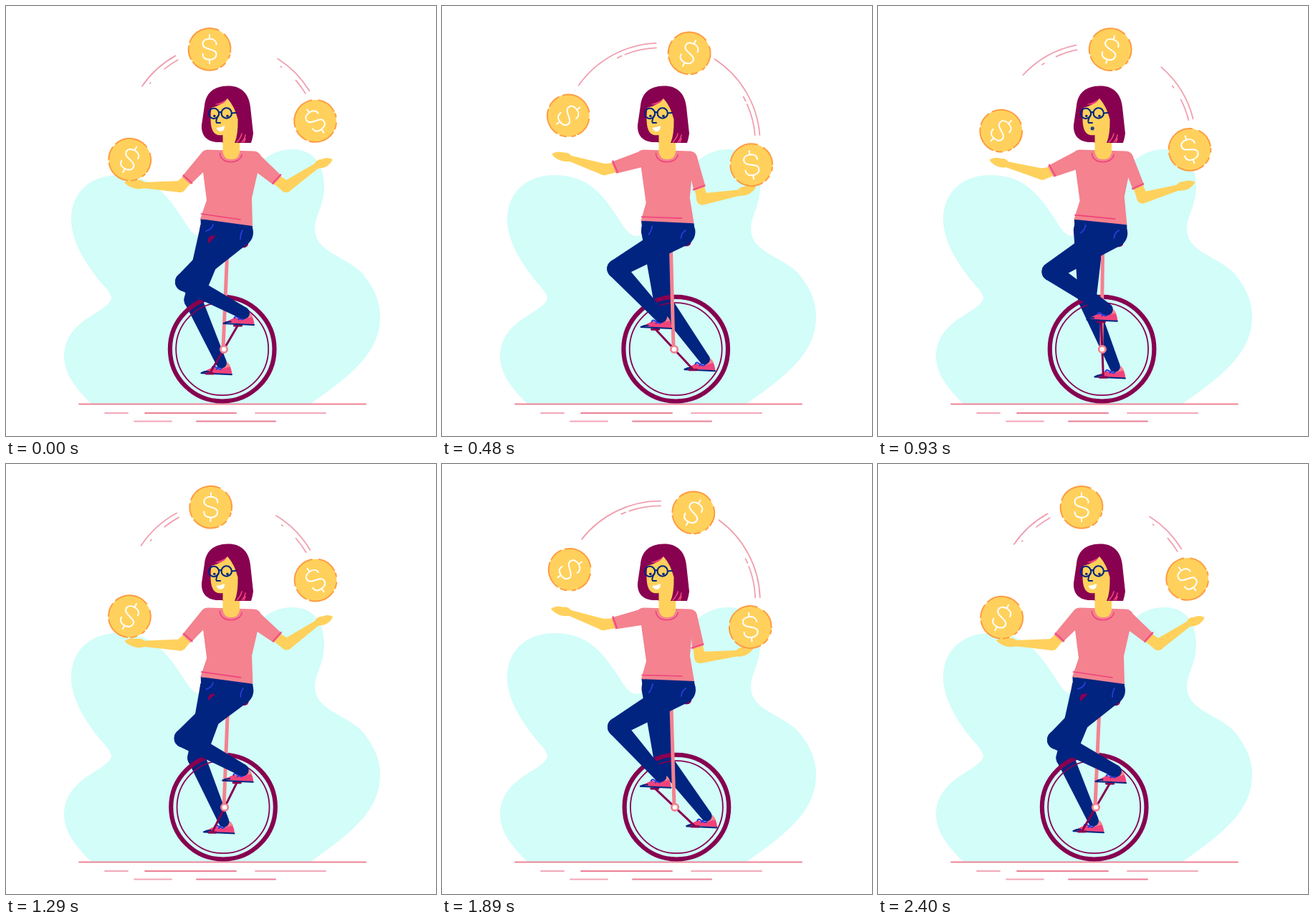
An HTML page with a canvas for the animation above (2430 ms loop, 600 by 600 pixels).

```html
<!DOCTYPE html>
<html lang="en">
<head>
<meta charset="utf-8">
<title>Juggling unicyclist</title>
<style>
  html, body { margin: 0; width: 100%; height: 100%; overflow: hidden; background: #fff; }
  canvas { display: block; }
</style>
</head>
<body>
<canvas id="stage" width="600" height="600"></canvas>
<script>
const ctx = document.getElementById('stage').getContext('2d');
const TAU = Math.PI * 2, RAD = Math.PI / 180;
const LOOP = 2430, STEP = 30, SWING = 1200, REACH = 690;
const C = {
  mint: '#d2fdf9', navy: '#002480', wine: '#870150', rose: '#f4828f', hot: '#f0437b',
  skin: '#ffd15c', orange: '#ff9c42', blue: '#2b3bdc', trail: '#f0a0b0', white: '#fff'
};

// Eased back-and-forth: 0 at time zero, 1 at REACH, with its own lag and bias.
function swing(t, lag, bias) {
  const g = time => {
    const u = (1 - Math.cos(TAU * (time - lag) / SWING)) / 2;
    return u + bias * u * (1 - u);
  };
  return (g(t) - g(0)) / (g(REACH) - g(0));
}

// Quadratic blend through three poses at 0, mid and 1.
const blender = (v, mid) => (a, b, c) => a.map((p, i) => {
  const k = ((b[i] - p) / mid - (c[i] - p)) / (mid - 1);
  return p + v * (c[i] - p - k) + v * v * k;
});

function fill(color, d) {
  ctx.fillStyle = color;
  ctx.fill(new Path2D(d));
}

function stroke(color, width, d) {
  ctx.strokeStyle = color;
  ctx.lineWidth = width;
  ctx.stroke(new Path2D(d));
}

function arc(color, width, x, y, r, from = 0, to = 360) {
  ctx.beginPath();
  ctx.arc(x, y, r, from * RAD, to * RAD);
  ctx.strokeStyle = color;
  ctx.lineWidth = width;
  ctx.stroke();
}

function disc(color, x, y, r) {
  ctx.beginPath();
  ctx.arc(x, y, r, 0, TAU);
  ctx.fillStyle = color;
  ctx.fill();
}

// Tapered segment with round ends.
function limb(color, [x0, y0], r0, [x1, y1], r1) {
  const a = Math.atan2(y1 - y0, x1 - x0);
  const nx = -Math.sin(a), ny = Math.cos(a);
  disc(color, x0, y0, r0);
  disc(color, x1, y1, r1);
  ctx.beginPath();
  ctx.moveTo(x0 + nx * r0, y0 + ny * r0);
  ctx.lineTo(x1 + nx * r1, y1 + ny * r1);
  ctx.lineTo(x1 - nx * r1, y1 - ny * r1);
  ctx.lineTo(x0 - nx * r0, y0 - ny * r0);
  ctx.fill();
}

function at(x, y, angle, draw) {
  ctx.save();
  ctx.translate(x, y);
  ctx.rotate(angle * RAD);
  draw();
  ctx.restore();
}

function background() {
  fill(C.mint, `M119 555C95 531 81 512 81 488C82 452 112 437 132 424Q147 414 147 407
    Q146 401 138 392C110 360 91 327 91 298C91 260 118 236 157 236C204 236 224 263 246 296
    C254 309 261 321 272 321C312 318 325 200 400 200C432 200 444 226 444 252
    C443 282 431 292 431 312C432 344 474 349 497 373C511 390 522 409 522 433
    C522 482 486 512 425 555Z`);
  stroke('#ee8496', 1.8, 'M102 555.5H502');
  stroke('#ea7f95', 1.8, 'M194 568H321M266 579.5H376');
  stroke('#f3a6b7', 1.8, 'M138 568H170M348 568H446M179 579.5H231');
}

function shoe([x, y]) {
  at(x, y, 0, () => {
    fill(C.rose, 'M27 -8L35 -16Q40 -14 42 -8L42 -4H30Z');
    fill(C.hot, 'M2 -.5Q9 -4 17 -8L27 -5L40 -8.5Q43 -8 44 2Z');
    stroke(C.navy, 2, 'M1 .2Q6 -2.5 11 -2M1 .4L43.5 2.4');
    stroke(C.blue, 2, 'M16 -7Q17 -11 21 -8L27 -5Q31 -6 29 -9Q25 -10 22 -5');
  });
}

function pocketLines(pose) {
  const [a, b, c, d, e, f, g, h] = pose(
    [279, 314, 289, 305, 327, 325, 330, 313],
    [284, 317, 290, 306, 330, 324, 337, 313],
    [289, 319, 294, 307, 334, 324, 340, 313]);
  stroke(C.blue, 1.8, `M${a} ${b}Q${c - 1} ${d + 6} ${c} ${d}M${e} ${f}Q${e} ${f - 7} ${g} ${h}`);
}

function rider(t) {
  const s = swing(t, 0, -.1);
  const pose = blender(s, .505);
  const wheelX = 301.7 + 25.7 * s, hubX = 304 + 21 * s, hubY = 479;
  const crank = (30.3 - 77 * s) * RAD;
  const dx = 38.7 * Math.sin(crank), dy = 38.7 * Math.cos(crank);
  const frontPedal = [hubX + dx, hubY - dy], backPedal = [hubX - dx, hubY + dy];
  const frontToe = [frontPedal[0] - 21, frontPedal[1] - 3];
  const backToe = [backPedal[0] - 13, backPedal[1] - .5];
  const ankle = toe => [toe[0] + 29, toe[1] - 14];
  const frontHip = pose([325, 316], [329, 317], [334, 315]);
  const backHip = pose([292, 312], [295, 313], [300, 313]);
  const frontKnee = pose([249, 385], [241, 369], [244, 367]);
  const backKnee = pose([261, 410], [296, 410], [308, 412]);
  const hem = pose([271, 297, 344, 307], [274, 298, 348, 305], [278, 300, 352, 303]);

  shoe(backToe);
  limb(C.navy, backHip, 21.5, backKnee, 12.5);
  limb(C.navy, backKnee, 12.5, ankle(backToe), 7.5);

  arc(C.wine, 6.2, wheelX, 478.7, 72.8);
  arc(C.wine, 1.8, wheelX, 478.7, 64.5);
  stroke(C.rose, 5, `M${hubX - 1} ${hubY - 2}L${309 + 11 * s} 338`);
  stroke(C.wine, 3, `M${frontPedal}L${backPedal}`);
  for (const [x, y] of [frontPedal, backPedal]) stroke(C.wine, 3.2, `M${x - 5} ${y + .4}H${x + 5}`);
  disc(C.white, hubX, hubY, 4);
  arc(C.rose, 2.8, hubX, hubY, 4.7);

  const seatX = 288 + 10 * s;
  // The seat lies between the two hips.
  ctx.fillStyle = C.navy;
  limb(C.navy, backHip, 20, frontHip, 17);
  limb(C.wine, [seatX, 327], 6.6, [seatX + 44, 331 - 2 * s], 6.2);
  fill(C.navy, `M${hem[0] + .5} ${hem[1]}L${hem[2]} ${hem[3]}L${frontHip[0] + 19} ${frontHip[1]}
    L${frontHip}L${seatX + 8} 319L${backHip[0] - 20} ${backHip[1]}Z`);
  shoe(frontToe);
  limb(C.navy, frontHip, 20, frontKnee, 13);
  limb(C.navy, frontKnee, 13, ankle(frontToe), 8.5);
  pocketLines(pose);
  upperBody(t, pose, hem);
}

function hand([wx, wy], [tx, ty], lift) {
  const a = Math.atan2(ty - wy, tx - wx) / RAD;
  const len = Math.hypot(tx - wx, ty - wy);
  at(wx, wy, a, () => fill(C.skin,
    `M-3 ${-4 * lift}Q2 ${-8 * lift} 8 ${-6 * lift}Q${len - 6} ${-7 * lift} ${len} ${-1 * lift}
     Q${len - 3} ${3 * lift} 12 ${5.5 * lift}Q4 ${7 * lift} -3 ${4 * lift}Z`));
}

function upperBody(t, pose, hem) {
  const v = swing(t, 55, .45), armPose = blender(v, .447);
  const [lx, ly, wx, wy, rx, ry, vx, vy] = pose(
    [275, 232, 280, 271, 351, 233, 343, 268],
    [276, 228, 282, 272, 349, 240, 344, 266],
    [278, 225, 285, 275, 348, 243, 346, 268]);
  // Each sleeve: outer corner and inner corner of its opening.
  const left = armPose([245.5, 238, 257.5, 249], [238.5, 228.5, 248.5, 243], [236.5, 214.5, 242, 230.5]);
  const right = armPose([384.5, 237, 373, 249.5], [375.5, 246.5, 361, 255], [365.5, 253, 349, 258.5]);
  const arms = [
    [left, 1, [243, 252, 190, 250, 165, 247], [233, 241, 181, 230, 158, 225], [225, 224, 176, 207, 152, 203]],
    [right, -1, [391, 252, 435, 222, 456, 215], [376, 264, 425, 244, 447, 238], [360, 270, 414, 264, 436, 256]]
  ];
  for (const [cuff, side, ...poses] of arms) {
    const [ex, ey, hx, hy, tx, ty] = armPose(...poses);
    limb(C.skin, [(cuff[0] + cuff[2]) / 2, (cuff[1] + cuff[3]) / 2], 7, [ex, ey], 8);
    limb(C.skin, [ex, ey], 8, [hx, hy], 4);
    hand([hx, hy], [tx, ty], -side);
  }

  fill(C.rose, `M282 200.5L346 202.5Q353 203 355.5 209L${right[0]} ${right[1]}L${right[2]} ${right[3]}
    L${rx} ${ry}L${vx} ${vy}L${hem[2]} ${hem[3]}L${hem[0]} ${hem[1]}L${wx} ${wy}L${lx} ${ly}
    L${left[2]} ${left[3]}L${left[0]} ${left[1]}L274 203.5Q277 200.5 282 200.5Z`);
  const cuffLine = ([a, b, c, d], dx) => `M${a + dx} ${b - 1.8}L${c + dx} ${d - 1.8}`;
  const [a, b, c, d] = pose([272.5, 290, 327, 298], [275.5, 292, 331, 297], [279, 294.5, 335, 296]);
  stroke(C.hot, 1.7, cuffLine(left, 2) + cuffLine(right, -1) + `M${a} ${b}L${c} ${d}`);
}

function head(surprised) {
  fill(C.wine, `M309 111.5C327 111 339 121 341 141L345 178Q344 185 342 191H302V190H296
    C281 190 272 181 273 166L277 139C279 121 290 112 309 111.5Z`);
  fill(C.skin, `M309 129Q301 139 286.5 142C285 154 285 166 288 173C291 180 297 181 302.5 180
    V204Q304 214 314 214Q325 214 326 204V191H319Q324 180 323.5 158Q319 140 309 129Z`);
  stroke(C.hot, 1.7, 'M298.5 205.5C299 222 327 221 329 207.5');
  stroke(C.hot, 1.6, 'M329 178Q328 184 322 190M334 180Q333 186 329 190M334 185L332 190');
  fill(C.hot, 'M291 137Q302 135 309 129Q303 140 291 137Z');
  arc(C.navy, 2.1, 290, 150, 7.2);
  arc(C.navy, 2.1, 307.7, 149.5, 7.2);
  stroke(C.navy, 2, 'M297 149Q299 147 300.5 149M315 149.5L321 149M296 153Q292 161 294 163H299');
  disc(C.navy, 290.8, 153.5, 1.8);
  disc(C.navy, 309, 153.5, 1.8);
  if (surprised) disc('#1c4384', 299.2, 170.8, 2.6);
  else fill(C.white, 'M293.5 170Q300 169.5 305 167Q305.5 174 299.5 175Q295 174.5 293.5 170Z');
}

function coin() {
  disc(C.skin, 0, 0, 29.3);
  const rim = [[-160, -65], [-45, 8], [16, 25], [42, 58], [68, 142], [152, 188]];
  for (const [from, to] of rim) arc(C.orange, 2, 0, 0, 29.4, from, to);
  stroke(C.white, 2, `M9.5 -6.5C9.5 -12 5 -14.5 0 -14.5C-5.5 -14.5 -9.5 -12 -9.5 -7.5
    C-9.5 2 9.5 -2 9.5 7C9.5 12 5 14.5 0 14.5C-6 14.5 -9.5 11.5 -9.5 6.5M0 -20V-15M0 15V20`);
}

function juggling(t) {
  const turn = 29.4 * swing(t, 30, .35);
  const stretch = swing(t, -20, -.2);
  for (const base of [240.8, 328.6]) {
    const end = base + turn;
    const line = (r, from, to) => arc(C.trail, 1.8, 304.5, 191, r, from, to);
    line(139.3, end - 26.2 - 25.8 * stretch, end);
    line(132.7, end - 9.8 - 9.4 * stretch, end);
    line(132.7, end - 22.1 - 2.2 * stretch, end - 21.5);
  }
  for (const [angle, tilt] of [[170, 28], [-98.25, 0], [-13.5, -36]]) {
    const a = (angle + turn) * RAD;
    at(303 + 132.3 * Math.cos(a), 191.3 + 132.3 * Math.sin(a), tilt + turn, coin);
  }
}

function render(now) {
  const t = Math.floor(now % LOOP / STEP) * STEP;
  ctx.fillStyle = C.white;
  ctx.fillRect(0, 0, 600, 600);
  ctx.lineCap = 'round';
  ctx.lineJoin = 'round';
  background();
  rider(t);
  head(t >= 600 && t < 1200);
  juggling(t);
}

const start = performance.now();
function tick() {
  render(performance.now() - start);
  requestAnimationFrame(tick);
}
tick();
</script>
</body>
</html>
```
